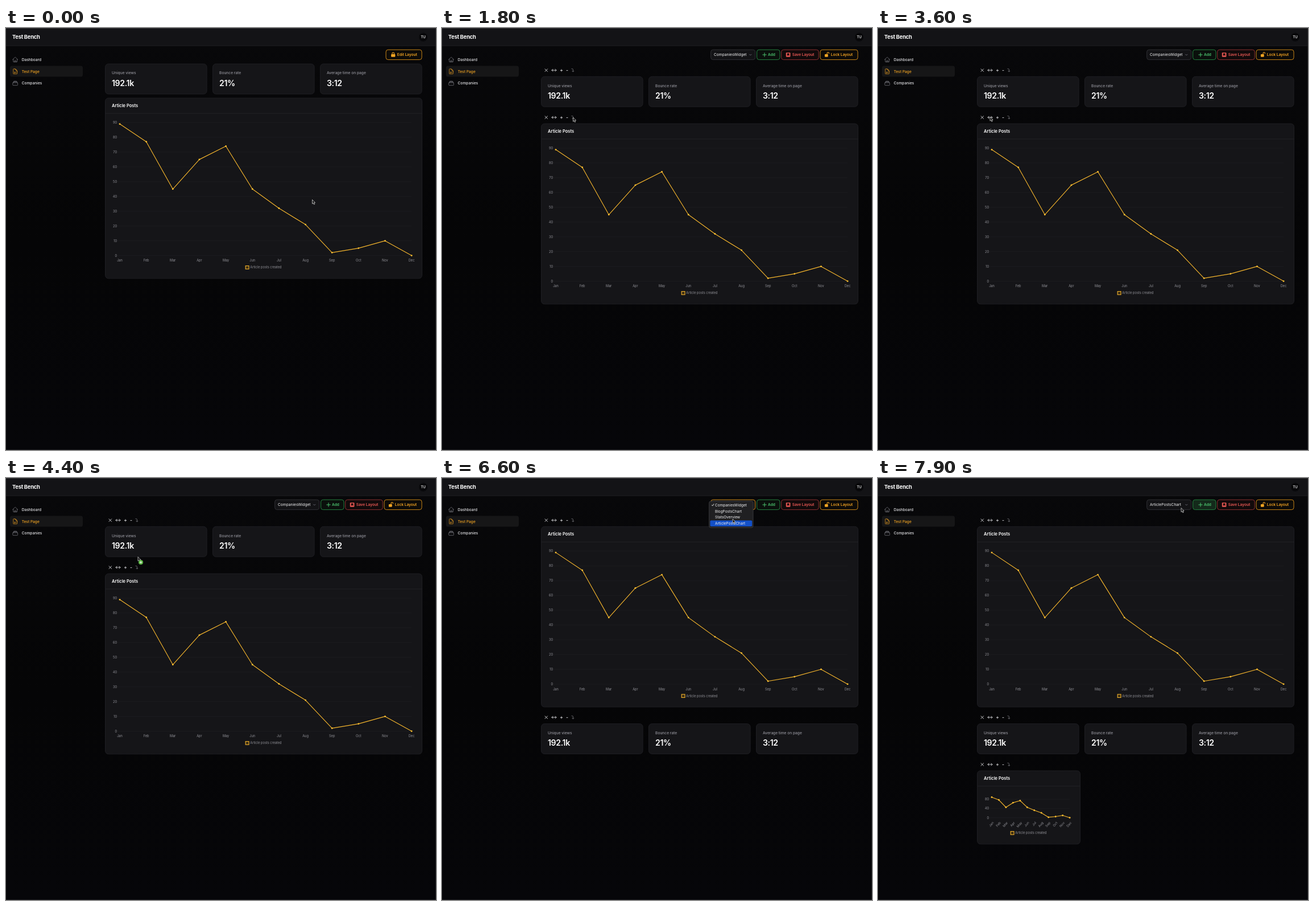
An HTML page for the animation above (8000 ms loop, 756 by 741 pixels).

```html
<!DOCTYPE html>
<html lang="en">
<head>
<meta charset="utf-8">
<title>Layout editor</title>
<style>
  html, body { margin: 0; width: 100%; height: 100%; overflow: hidden; background: #060608; }
  svg { display: block; width: 756px; height: 741px; font: 500 6.6px Inter, sans-serif; }
  text { white-space: pre; }
  .card { fill: #151518; stroke: #232327; stroke-width: .8; }
  .label { fill: #94949c; }
  .value { fill: #fff; font-size: 14.1px; font-weight: 600; letter-spacing: -.35px; }
  .head { fill: #fff; font-size: 7.5px; font-weight: 600; }
  .tick { fill: #929298; font-size: 5.65px; font-weight: 400; }
  .grid { stroke: #202024; stroke-width: .6; }
  .line { fill: none; stroke: #f2b32c; stroke-width: 1.15; stroke-linejoin: round; }
  .btn { font-weight: 600; font-size: 6.55px; }
  .icon { fill: none; stroke-width: 1.5; stroke-linecap: round; stroke-linejoin: round; }
  .tools { fill: none; stroke: #d6d6da; stroke-width: .9; stroke-linecap: round; stroke-linejoin: round; }
</style>
</head>
<body>
<svg viewBox="0 0 756 741">
  <defs>
    <linearGradient id="page" x2="0" y2="1">
      <stop stop-color="#08080a"/><stop offset=".5" stop-color="#050506"/><stop offset="1" stop-color="#060609"/>
    </linearGradient>
  </defs>
  <rect width="756" height="741" fill="url(#page)"/>
  <rect width="756" height="31" fill="#131316"/>
  <path d="M0 31.2H756" stroke="#242427" stroke-width=".8"/>
  <path d="M0 .5H756" stroke="#353538"/>
  <path d="M755.5 0V741M0 740.5H756" stroke="#222225" stroke-width=".8"/>
  <text x="11" y="19.3" fill="#fff" font-size="9.4" font-weight="700" letter-spacing="-.23">Test Bench</text>
  <circle cx="733.5" cy="16" r="7.5" fill="#08080a"/>
  <text x="733.5" y="18.2" text-anchor="middle" fill="#fff" font-size="6.2">TU</text>
  <rect x="7" y="66.5" width="128" height="19" rx="3.6" fill="#161617"/>
  <g id="menu"></g>
  <g id="app"></g>
  <g id="cursor">
    <path d="M0 0V7.2L1.7 5.7L2.9 8.4L4.2 7.8L3 5.2H5.1Z" fill="#111" stroke="#d8d8d8" stroke-width=".75" stroke-linejoin="round"/>
    <g id="badge">
      <circle cx="5" cy="9.5" r="4" fill="#5cb544"/>
      <path d="M3 9.5H7M5 7.5V11.5" stroke="#fff" stroke-width="1"/>
    </g>
  </g>
</svg>
<script>
const LOOP = 8000, STEP = 100, LEFT = 174.5, RIGHT = 731;
const $ = id => document.getElementById(id);
const months = 'Jan Feb Mar Apr May Jun Jul Aug Sep Oct Nov Dec'.split(' ');
const posts = [89, 77, 45, 65, 74, 45, 32, 21, 2, 5, 10, 0];
const options = ['CompaniesWidget', 'BlogPostsChart', 'StatsOverview', 'ArticlePostsChart'];

// Moments of the session, in ms
const EDIT = 800, SHRINK = 2000, EXPAND = 3600, DRAG = 4300, SWAP = 4700,
      DROP = 4900, OPEN = 6200, PICK = 7000, HOVER = 7300, ADD = 7600;

// Cursor stops: time, x, y
const path = [
  [0, 538.5, 301.5], [100, 540, 298], [600, 700, 45], [1000, 700, 46], [1800, 230.5, 157],
  [2000, 221, 156], [2800, 221, 156], [3300, 197, 156], [3600, 197, 156],
  [4000, 230.5, 157], [4200, 231, 156], [4400, 232, 138.5], [4700, 238, 108],
  [4900, 262, 105], [5100, 397, 109], [5300, 398, 108], [6000, 512, 46], [6200, 512, 46],
  [6600, 511, 72], [6800, 511, 79], [7000, 511, 79], [7400, 573, 47], [7700, 573, 47],
  [7900, 533, 52.5]
];

const text = (x, y, str, cls, extra = '') => `<text x="${x}" y="${y}" class="${cls}" ${extra}>${str}</text>`;
const box = (x, y, w, h, r, attrs) => `<rect x="${x}" y="${y}" width="${w}" height="${h}" rx="${r}" ${attrs}/>`;
const card = (x, y, w, h) => box(x, y, w, h, 5.6, 'class="card"');

function icon(x, y, color, d) {
  return `<path class="icon" stroke="${color}" transform="translate(${x - 5.4} ${y - 5.4}) scale(.45)" d="${d}"/>`;
}

function sidebar() {
  const items = [
    ['Dashboard', 55.5, '#e4e4e7', 'M2 12 11 3Q12 2 13 3L22 12M4.5 10V20Q4.5 21 5.5 21H9.7V16Q9.7 15 10.7 15H13.3Q14.3 15 14.3 16V21H18.5Q19.5 21 19.5 20V10M8 21H16'],
    ['Test Page', 76.2, '#f5a623', 'M19.5 14V11.5Q19.5 8 16 8H15Q13.5 8 13.5 6.5V5.5Q13.5 2.2 10 2.2H5.6Q4.5 2.2 4.5 3.4V20.6Q4.5 21.8 5.6 21.8H18.4Q19.5 21.8 19.5 20.6V11Q18.5 3.5 10.5 2.2M8.2 15H15.7M8.2 18H12'],
    ['Companies', 97, '#e4e4e7', 'M6 6.8V6Q6 3.8 8.2 3.8H15.8Q18 3.8 18 6V6.8M3.8 9.8V9Q3.8 6.8 6 6.8H18Q20.2 6.8 20.2 9V9.8M4.5 9.8H19.5Q21.8 9.8 21.8 12V18Q21.8 20.2 19.5 20.2H4.5Q2.2 20.2 2.2 18V12Q2.2 9.8 4.5 9.8']
  ];
  return items.map(([name, y, color, d]) =>
    icon(16.2, y, color === '#e4e4e7' ? '#85858d' : color, d) + text(27.7, y + 2.4, name, '', `fill="${color}"`)).join('');
}

function tools(y) {
  return `<g class="tools" transform="translate(0 ${y})">
    <path d="M181 -2.3L185.6 2.3M185.6 -2.3L181 2.3M193 0H201M195 -2L193 0L195 2M199 -2L201 0L199 2M208.3 .3H211.7M210 -1.4V2M219 .4H221"/>
    <path stroke="#77777d" stroke-width=".8" d="M227.8 -2.5H229.3Q230.4 -2.5 230.4 -1.4V2.6M228.8 1.2L230.4 2.8L232 1.2"/>
  </g>`;
}

function stats(y) {
  const data = [['Unique views', '192.1k'], ['Bounce rate', '21%'], ['Average time on page', '3:12']];
  return data.map(([name, value], i) => {
    const x = LEFT + i * 189;
    return card(x, y, 178.6, 53) + text(x + 11.6, y + 18.3, name, 'label') + text(x + 11.5, y + 38.7, value, 'value');
  }).join('');
}

const chartWidth = cols => 47 * cols - 7;
const chartHeight = cols => chartWidth(cols) / 2 + 38.3;

function chart(top, cols) {
  const w = chartWidth(cols), h = chartHeight(cols), slanted = cols < 6;
  const zero = top + h - (slanted ? 46.3 : 40.2);
  const plot = zero - top - 43;
  const step = plot > 125 ? 10 : plot > 60 ? 20 : 40;
  const unit = plot / { 10: 90, 20: 100, 40: 97.5 }[step];
  const x0 = 200, x1 = LEFT + w - 18.4, mid = LEFT + w / 2;
  const px = i => x0 + (x1 - x0) * i / 11;
  const py = v => zero - v * unit;
  let out = card(LEFT, top, w, h) + text(LEFT + 11.6, top + 15.7, 'Article Posts', 'head') +
    `<path d="M${LEFT} ${top + 27}h${w}" stroke="#25252a" stroke-width=".8"/>`;
  for (let v = 0; v <= 90; v += step) {
    out += `<path class="grid" d="M196.5 ${py(v)}H${x1}"/>` + text(195, py(v) + 2, v, 'tick', 'text-anchor="end"');
  }
  months.forEach((m, i) => {
    out += slanted
      ? `<text class="tick" text-anchor="end" transform="translate(${px(i) + 3.8} ${zero + 9}) rotate(-50)">${m}</text>`
      : text(px(i), zero + 10.7, m, 'tick', 'text-anchor="middle"');
  });
  out += `<polyline class="line" points="${posts.map((v, i) => px(i) + ',' + py(v)).join(' ')}"/>`;
  posts.forEach((v, i) => { out += `<circle cx="${px(i)}" cy="${py(v)}" r="1.45" fill="#f8bd30"/>`; });
  const ly = top + h - 19.4;
  return out + box(mid - 31.8, ly - 2.8, 5.8, 5.6, 0, 'fill="#3a2c12" stroke="#f2b32c" stroke-width="1.1"') +
    text(mid - 23.7, ly + 2, 'Article posts created', 'tick');
}

function button(x, right, label, tx, color, border, fill) {
  return box(x, 38.2, right - x, 17.4, 3.8, `fill="${fill}" stroke="${border}" stroke-width="1"`) +
    text(tx, 49.4, label, 'btn', `fill="${color}"`);
}

function padlock(x, open) {
  const shackle = open ? `M${x + .5} 46.5V44.5a1.7 1.7 0 0 1 3.4 0V45.2` : `M${x - 1.8} 46.5V44.8a1.8 1.8 0 0 1 3.6 0V46.5`;
  return box(x - 3.6, 46, open ? 5.8 : 7.2, 4.8, 1, 'fill="#f5a623"') +
    `<path d="${shackle}" fill="none" stroke="#f5a623" stroke-width="1.1"/>`;
}

function actions(t) {
  if (t < EDIT) return button(668, RIGHT, 'Edit Layout', 687.7, '#f5a623', '#c98516', '#0d0b08') + padlock(680.7, false);
  const open = t >= OPEN && t < PICK;
  return box(472.7, 38.2, 78, 17.4, 3.8, `fill="#131316" stroke="${open ? '#d28b18' : '#303035'}" stroke-width="1"`) +
    text(478, 49.3, options[t < PICK ? 0 : 3], '', 'fill="#f4f4f5" font-weight="400" font-size="6.65"') +
    '<path d="M540.3 46L542.3 48L544.3 46" fill="none" stroke="#77777f" stroke-width=".8"/>' +
    button(553.6, 594, 'Add', 573, '#4cc46f', '#25803f', t >= HOVER ? '#142a1b' : '#0a100c') +
    '<path d="M563.4 47H570.6M567 43.4V50.6" stroke="#4cc46f" stroke-width="1"/>' +
    button(596.7, 662.2, 'Save Layout', 615.7, '#ee5a56', '#8c3030', '#120a0b') +
    box(604.8, 43.2, 7.6, 7.6, 1, 'fill="#ee5a56"') +
    '<path d="M606.7 44.4H610.5V49.2L608.6 47.8L606.7 49.2Z" fill="#1a0c0d"/>' +
    button(665, RIGHT, 'Lock Layout', 683.8, '#f5a623', '#c98516', '#0d0b08') + padlock(676.5, true);
}

function dropdown(y) {
  const hit = Math.max(0, Math.min(3, Math.floor((y - 39) / 10.8)));
  return box(469.6, 40.8, 77.4, 46.4, 3, 'fill="#202022" stroke="#48484b" stroke-width=".7"') +
    box(471.4, 42.1 + hit * 10.8, 73.8, 10.6, 1.8, 'fill="#1350c8"') +
    '<path d="M474.2 47.4L475.6 49L478 45.4" fill="none" stroke="#fff" stroke-width=".9"/>' +
    options.map((o, i) => text(480, 49.7 + i * 10.8, o, '', 'fill="#f4f4f5" font-weight="400" font-size="6.45"')).join('');
}

function columns(t) {
  if (t < SHRINK || t >= EXPAND) return 12;
  return Math.max(4, 11 - Math.floor((t - SHRINK) / STEP));
}

function widgets(t) {
  if (t < EDIT) return stats(63) + chart(123, 12);
  if (t < SWAP) return tools(74.2) + stats(85.3) + tools(157) + chart(168, columns(t));
  return tools(74.2) + chart(85.3, 12) + tools(420.3) + stats(431.5) +
    (t < ADD ? '' : tools(503) + chart(514, 4));
}

function pointer(t) {
  const i = path.findIndex(p => p[0] > t);
  if (i < 0) return path[path.length - 1].slice(1);
  const [a, b] = [path[i - 1], path[i]];
  const k = (t - a[0]) / (b[0] - a[0]), e = k * k * (3 - 2 * k);
  return [a[1] + (b[1] - a[1]) * e, a[2] + (b[2] - a[2]) * e];
}

let shown = -1;
function frame(now) {
  const t = Math.floor(now % LOOP / STEP) * STEP;
  if (t !== shown) {
    shown = t;
    const [x, y] = pointer(t);
    $('app').innerHTML = widgets(t) + actions(t) + (t >= OPEN && t < PICK ? dropdown(y) : '');
    $('cursor').setAttribute('transform', `translate(${x} ${y})`);
    $('badge').setAttribute('visibility', t >= DRAG && t < DROP ? 'visible' : 'hidden');
  }
  requestAnimationFrame(frame);
}

$('menu').innerHTML = sidebar();
frame(0);
</script>
</body>
</html>
```
